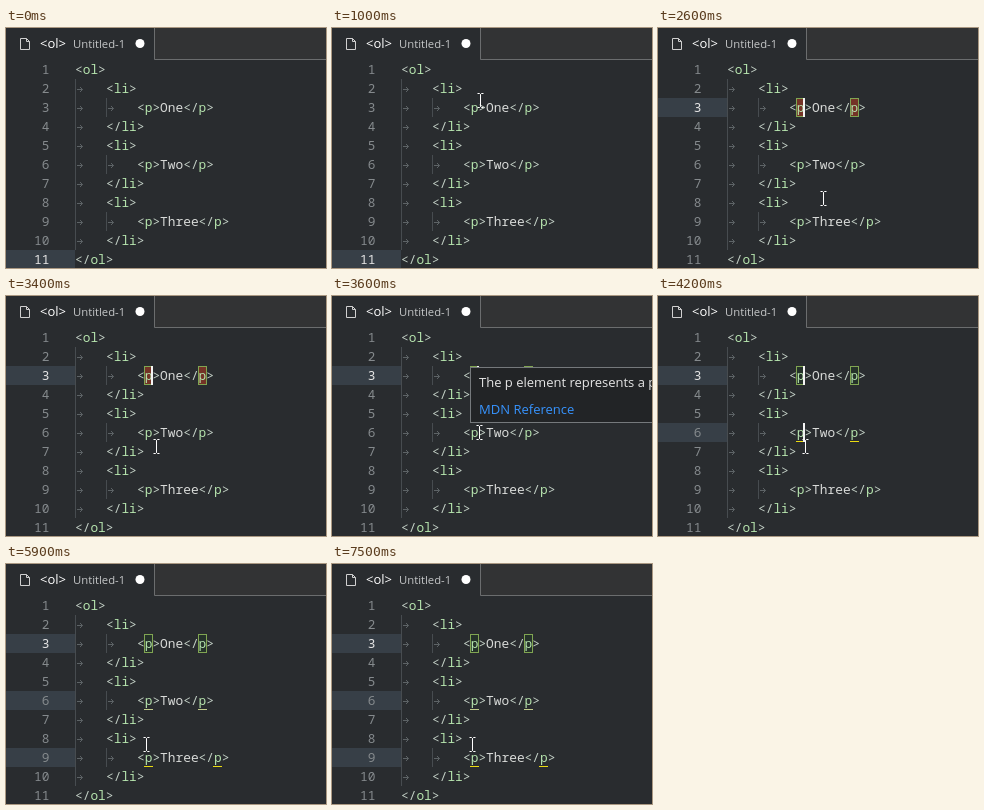
Recreate the animation shown at these times as an HTML page. Size 320 px wide and 240 px high, loop 8 s.

```html
<!DOCTYPE html>
<html lang="en">
<head>
<meta charset="utf-8">
<title>Editor</title>
<style>
  html, body { margin: 0; width: 100%; height: 100%; overflow: hidden; background: #292c2f; }
  svg { display: block; width: 100%; height: 100%; }
  text { white-space: pre; }
  .code { font: 12.83px "Noto Sans Mono", monospace; fill: #d8dad8; }
  .tag { fill: #b5e3ad; }
  .bracket { fill: #c3d0c6; }
  .number { text-anchor: end; fill: #858a8d; }
  .number.active { fill: #e4e4e4; }
  .ui { font: 500 13px "Open Sans", sans-serif; fill: #e6e6e6; }
</style>
</head>
<body>
<svg id="stage" viewBox="0 0 320 240">
  <rect width="320" height="240" fill="#292c2f"/>
  <rect x="148" width="172" height="32" fill="#323334"/>
  <path d="M148.5 0V31.5H320" fill="none" stroke="#6b6d6e"/>
  <path d="M14.5 10.5H20.5L23.5 13.5V21.5H14.5ZM20.5 10.5V13.5H23.5" fill="none" stroke="#d0d0d0"/>
  <text class="ui" x="34" y="20" style="fill:#fff">&lt;ol&gt;</text>
  <text class="ui" x="67" y="20" style="font-size:11.3px;fill:#c4c6c7">Untitled-1</text>
  <circle cx="134" cy="15.5" r="4.5" fill="#fff"/>
</svg>
<script>
const DURATION = 8000, STEP = 100, BLINK = 475;
const CHAR = 7.7, ROW = 19, LEFT = 69, INDENT = 31;
const stage = document.getElementById("stage");
const rowTop = n => 32 + (n - 1) * ROW;

function add(name, attrs, parent = stage) {
  const el = document.createElementNS("http://www.w3.org/2000/svg", name);
  for (const key in attrs) el.setAttribute(key, attrs[key]);
  return parent.appendChild(el);
}

function label(content, attrs, parent) {
  const el = add("text", attrs, parent);
  el.textContent = content;
  return el;
}

const show = (el, on) => el.setAttribute("visibility", on ? "visible" : "hidden");

const item = word => [[1, "<li>"], [2, `<p>${word}</p>`], [1, "</li>"]];
const lines = [[0, "<ol>"], ...["One", "Two", "Three"].flatMap(item), [0, "</ol>"]];

const gutters = {}, numbers = {};
for (const n of [3, 6, 9, 11])
  gutters[n] = add("rect", { y: rowTop(n), width: 69, height: ROW, fill: "#373f47" });

// Marks behind the two p tags of each paragraph row
const marks = {};
for (const n of [3, 6, 9]) {
  const closing = lines[n - 1][1].length - 2;
  const cells = [1, closing].map(col => Math.round(LEFT + 2 * INDENT + col * CHAR) - 1);
  marks[n] = {
    boxes: n === 3 ? cells.map(x => add("rect", {
      x: x + .5, y: rowTop(n) + .5, width: 8, height: 18, stroke: "#80a552" })) : [],
    lines: cells.map(x => add("rect", { x, y: rowTop(n) + 18, width: 9, height: 1 }))
  };
}

lines.forEach(([depth, source], i) => {
  const n = i + 1, top = rowTop(n);
  for (let d = 0; d < depth; d++) {
    const x = LEFT + d * INDENT;
    add("path", { d: `M${x + .5} ${top}v${ROW}`, stroke: "#474c50" });
    add("path", { d: `M${x + 2} ${top + 10.5}h5.5m-2.5 -2.5l2.5 2.5l-2.5 2.5`,
      fill: "none", stroke: "#5d6366" });
  }
  numbers[n] = label(n, { class: "code number", x: 43.5, y: top + 14 });
  const row = add("text", { class: "code", x: LEFT + depth * INDENT, y: top + 14 });
  for (const part of source.match(/<\/?|>|[^<>/]+/g)) {
    const type = /[<>]/.test(part) ? "bracket" : /^(ol|li|p)$/.test(part) ? "tag" : "";
    add("tspan", { class: type }, row).textContent = part;
  }
});

const carets = [3, 6, 9].map(n =>
  add("rect", { x: 145, y: rowTop(n), width: 2, height: ROW, fill: "#f4f4f4" }));

function makePopup(y) {
  const g = add("g", { transform: `translate(138 ${y})` });
  add("rect", { x: .5, y: .5, width: 190, height: 55, fill: "#222426", stroke: "#75797c" }, g);
  label("The p element represents a paragraph", { class: "ui", x: 9, y: 20 }, g);
  label("MDN Reference", { class: "ui", x: 9, y: 47, style: "fill:#3794ff" }, g);
  return g;
}
const popups = [
  { el: makePopup(71), from: 3500, to: 3800 },
  { el: makePopup(128), from: 4700, to: 5100 }
];

const beam = add("path", { d: "M-3 -7H-1L0 -6L1 -7H3M0 -6V6M-3 7H-1L0 6L1 7H3",
  fill: "none", stroke: "#fff" });
const arrow = add("path", { d: "M0 0V14L3.2 11L5.5 16L7.7 15L5.5 10.2H10Z",
  fill: "#fff", stroke: "#111", "stroke-width": .8 });

// Pointer path: time, x, y
const path = [
  [400, 37, 1], [700, 102, 41], [1000, 148, 72], [1900, 148, 72],
  [2200, 158, 110], [2600, 165, 170], [2800, 158, 182], [3000, 157, 181],
  [3200, 155, 178], [3500, 147, 136], [4100, 147, 136],
  [4500, 148, 192], [5400, 148, 192], [5600, 145, 188],
  [5700, 145, 188], [5900, 140, 180]
];

function pointerAt(t) {
  const next = path.findIndex(p => p[0] > t);
  if (next < 0) return path[path.length - 1].slice(1);
  const [t0, x0, y0] = path[Math.max(next - 1, 0)], [t1, x1, y1] = path[next];
  const k = Math.max(0, (t - t0) / (t1 - t0));
  return [x0 + (x1 - x0) * k, y0 + (y1 - y0) * k].map(Math.round);
}

const clicks = [1500, 3800, 5100];

function render(t) {
  const count = clicks.filter(c => t >= c).length;
  const blink = count > 0 && Math.floor((t - clicks[count - 1]) / BLINK) % 2 === 0;
  carets.forEach((el, i) => show(el, blink && i < count));

  [3, 6, 9].forEach((n, i) => {
    const used = i < count;
    show(gutters[n], used);
    for (const el of marks[n].lines) {
      show(el, used && !(n === 3 && t >= 1800));
      el.setAttribute("fill", n === 6 && count > 2 ? "#c3cc8c" : "#eadb10");
    }
  });
  for (const el of marks[3].boxes) {
    show(el, t >= 1800);
    el.setAttribute("fill", count > 1 ? "#25322a" : "#743326");
  }
  show(gutters[11], count === 0);
  numbers[3].classList.toggle("active", count > 0);
  numbers[11].classList.toggle("active", count === 0);

  for (const { el, from, to } of popups) {
    show(el, t >= from && t < to);
    el.setAttribute("opacity", t > from ? 1 : .5);
  }

  const [x, y] = pointerAt(t);
  show(beam, t >= 400 && y >= 32);
  show(arrow, t >= 400 && y < 32);
  for (const el of [beam, arrow])
    el.setAttribute("transform", `translate(${x + .5} ${y + .5})`);
}

const start = performance.now();
function tick() {
  const t = (performance.now() - start) % DURATION;
  render(Math.floor(t / STEP) * STEP);
  requestAnimationFrame(tick);
}
tick();
</script>
</body>
</html>
```
